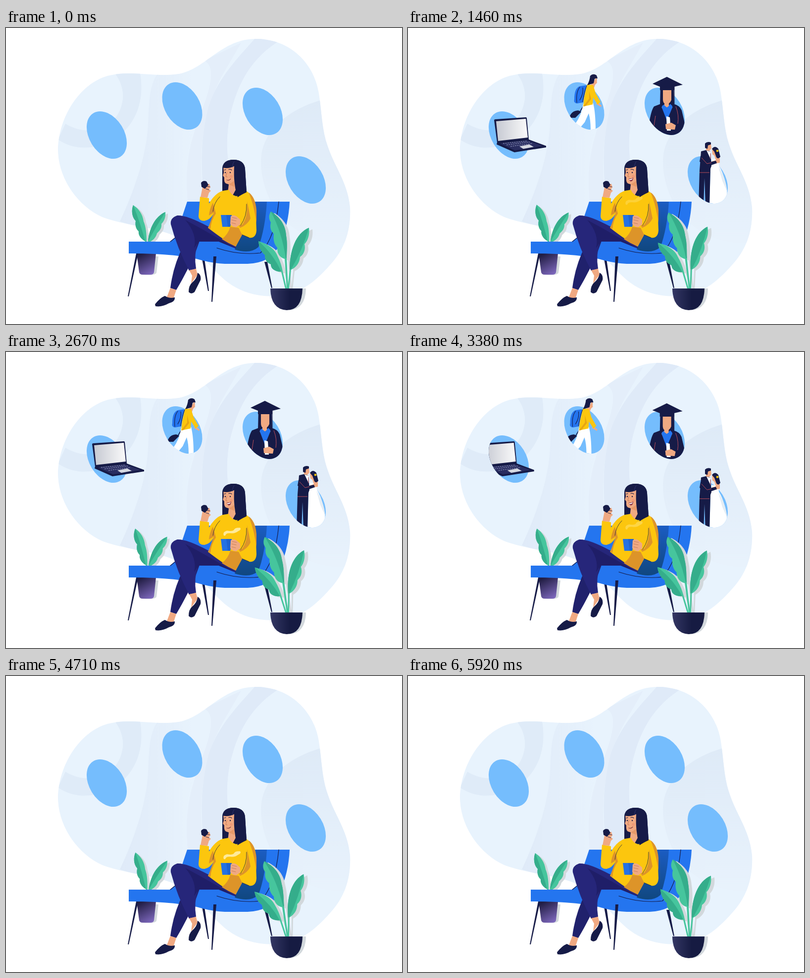
An HTML page for the animation above (5.96 s loop, 800 by 600 pixels).

```html
<!DOCTYPE html>
<html lang="en">
<head>
<meta charset="utf-8">
<title>Planning life goals</title>
<style>
  html, body { margin: 0; width: 100%; height: 100%; overflow: hidden; background: #fff }
  svg { display: block; width: 100vw; height: 100vh }
  .skin { fill: #f0a982 } .navy { fill: #161b47 } .yellow { fill: #fcc60e }
  .line { fill: none; stroke: #161b47; stroke-linecap: round; stroke-linejoin: round }
  .light { fill: #46c59d } .dark { fill: #35ad8b } .shade { fill: #d2d8dc }
</style>
</head>
<body>
<svg viewBox="0 0 800 600">
  <defs>
    <ellipse id="oval" rx="35.3" ry="52" transform="rotate(-31.5)"/>
    <path id="above" d="M-40.5-16V-90H90V16H40.5Z"/>
    <path id="beside" d="M-13.5-48L13.5 48H90V-48Z"/>
    <clipPath id="clipLaptop"><use href="#oval" x="203.5" y="217"/><use href="#beside" x="203.5" y="217"/></clipPath>
    <clipPath id="clipTravel"><use href="#oval" x="356" y="158"/><use href="#above" x="356" y="158"/></clipPath>
    <clipPath id="clipGrad"><use href="#oval" x="518.5" y="169"/><use href="#above" x="518.5" y="169"/></clipPath>
    <clipPath id="clipCouple"><use href="#oval" x="605.5" y="308"/><use href="#above" x="605.5" y="308"/></clipPath>

    <path id="blobShape" d="M510 22C572 24 622 69 632 132C638 171 638 207 650 240C664 282 691 315 695 364C697 410 684 449 655 480C626 513 598 536 558 542C514 548 473 537 441 510C408 481 376 434 330 417C287 402 235 399 194 383C144 360 105 304 105 246C107 178 150 113 205 97C254 84 300 101 350 93C405 82 437 19 510 22Z"/>
    <clipPath id="clipBlob"><use href="#blobShape"/></clipPath>

    <linearGradient id="fadeRight"><stop stop-color="#dfeaf8"/><stop offset="1" stop-color="#e8f3fd"/></linearGradient>
    <linearGradient id="fadeUp" x1="0" y1="1" x2="0" y2="0"><stop stop-color="#e8f2fc"/><stop offset="1" stop-color="#deeaf7"/></linearGradient>
    <linearGradient id="screen"><stop stop-color="#c6c9d2"/><stop offset="1" stop-color="#fafafa"/></linearGradient>
    <linearGradient id="cushion" x1="0" y1="0" x2="0" y2="1"><stop stop-color="#1b5cc2"/><stop offset="1" stop-color="#10477f"/></linearGradient>
    <linearGradient id="backPot" x1=".3" y1="0" x2=".8" y2="1"><stop stop-color="#211d43"/><stop offset="1" stop-color="#806ac0"/></linearGradient>
    <linearGradient id="frontPot"><stop stop-color="#343764"/><stop offset=".6" stop-color="#161b42"/></linearGradient>

    <path id="backLeaves" d="M257 359C269 367 276 378 278 392C283 404 284 418 284 432L288 470H286L281 432C273 428 267 420 268 412C261 406 261 397 262 391C254 383 253 369 257 359ZM322 373C323 386 318 393 314 397C315 407 309 412 305 416C303 425 297 430 290 434L288 470H286L287 433C289 407 301 382 322 373Z"/>
    <path id="frontLeaves" d="M535 372C553 383 565 399 566 421C569 437 567 453 567 466L570 528H567L563 468C552 465 547 455 548 445C540 437 540 425 541 417C532 409 534 399 535 394C530 386 531 379 535 372ZM612 405C614 420 609 432 603 438C606 451 600 460 594 464C593 477 586 485 576 490L572 528H569L573 490C573 452 585 416 612 405ZM510 432C530 438 544 449 549 463C554 473 557 483 559 493L567 528H564L556 494C543 494 535 488 535 479C524 474 523 467 523 460C514 452 511 443 510 432Z"/>
  </defs>

  <use href="#blobShape" fill="#e8f3fd"/>
  <g clip-path="url(#clipBlob)">
    <path fill="#dfebf8" d="M220 92H271C280 145 265 193 222 223C185 247 139 250 105 226L120 194C162 220 211 207 229 169C241 143 238 116 220 92Z"/>
    <path fill="url(#fadeRight)" d="M305 94C283 128 291 181 284 226C275 286 251 347 230 392L380 440V84Z"/>
    <path fill="#e4eefa" d="M400 66C431 80 404 144 389 185C361 262 363 310 368 360H400C386 260 397 169 437 96L475 30Z"/>
    <path fill="#dfeaf8" d="M504 20C472 57 429 99 410 157C394 216 391 279 402 356H470C445 294 439 218 458 157C473 102 503 57 549 28Z"/>
    <path fill="url(#fadeUp)" d="M637 146C567 166 515 211 515 271C516 355 575 440 690 436L710 300Z"/>
  </g>

  <g fill="#75bdfd">
    <use href="#oval" x="203.5" y="217"/><use href="#oval" x="356" y="158"/>
    <use href="#oval" x="518.5" y="169"/><use href="#oval" x="605.5" y="308"/>
  </g>

  <g clip-path="url(#clipLaptop)"><g id="laptop">
    <path class="navy" d="M174 187Q174 185 177 185L238 181Q240 181 240 183L244 226L279 239V242L215 252L179 236L180 232Z"/>
    <path fill="url(#screen)" d="M178 189L238 184L242 222L182 229Z"/>
    <path fill="#292d60" d="M186 234L241 228L272 239L216 248Z"/>
    <path stroke="#9ba1c5" stroke-dasharray="3 1.5" d="M192 234L240 229M199 237L246 231M207 240L252 234"/>
    <path fill="#d5d8e1" d="M225 240L245 236L254 241L233 245Z"/>
  </g></g>

  <g clip-path="url(#clipTravel)"><g id="travel">
    <path class="line" stroke-width="1.6" d="M355 157L347 170"/>
    <path class="navy" d="M326 182Q329 168 344 167L350 170L338 182Z"/>
    <path class="skin" d="M372 106H381L382 111L378 115L376 121L368 119ZM382 150L391 157L390 160L385 157L380 154Z"/>
    <path fill="#fff" d="M354 153L374 152Q379 172 379 207H369Q369 186 365 173L357 191L347 203L338 194Q351 176 354 153Z"/>
    <path class="yellow" d="M362 114L374 116L379 132L389 150L383 155L374 141L373 155L354 159L356 140Z"/>
    <path fill="#e6a514" d="M366 128L370 144L359 158L354 159L366 143Z"/>
    <path fill="#2474ee" d="M347 118L360 116L353 151L341 153Q334 152 336 144Q336 122 347 118Z"/>
    <path class="line" stroke-width="1.1" d="M347 120Q339 130 341 151M353 121Q355 133 347 146M361 117Q356 130 353 150"/>
    <path class="navy" d="M368 97Q374 91 381 96L383 102L377 103L375 112L362 116Q367 107 368 97Z"/>
    <path class="skin" d="M378 102L382 103L381 110L377 111Z"/>
  </g></g>

  <g clip-path="url(#clipGrad)"><g id="grad">
    <path class="navy" d="M510 116H537L538 160H509Z"/>
    <path fill="#2475ef" d="M513 158L519 154L523 160L530 154L534 158L532 181L523 188L515 180Z"/>
    <path class="skin" d="M515 126H532V146Q530 151 527 153V158L523 161L518 157V153Q515 150 515 145Z"/>
    <path class="navy" d="M510 154L523 188L537 154Q549 157 553 167L560 197V250H487V194Q491 167 497 159ZM494 113L523 99L555 115L538 119V126Q524 121 509 126V119Z"/>
    <path fill="none" stroke="#b94d59" d="M541 159Q548 177 545 194M500 178L497 198"/>
    <path fill="#fff" d="M522 179L529 181L531 208H523Z"/>
    <path class="skin" d="M520 195L532 192L541 197L539 206L521 205Z"/>
    <path class="line" stroke-width="1" d="M523 112L538 119V154"/>
  </g></g>

  <g clip-path="url(#clipCouple)"><g id="couple">
    <path fill="#fff" d="M613 265L627 268L628 279Q644 304 647 360H609L611 287Z"/>
    <path fill="#e5edf4" d="M627 281Q642 302 645 332L635 310Z"/>
    <path class="navy" d="M592 250L604 247L611 251L613 280L611 285L609 360H601L599 304L597 360H587L589 289Z"/>
    <path fill="#fff" d="M603 248L611 251L611 265Z"/>
    <path class="skin" d="M602 236L612 235L613 244L609 249L602 248ZM614 246L621 248L623 258L630 264L630 273L613 276L612 271L622 268L619 259L615 256Z"/>
    <path class="navy" d="M600 243V234Q605 229 612 232V236L606 238L605 245ZM614 245Q620 237 627 245L631 261Q627 267 623 262L619 251Z"/>
    <circle cx="625" cy="249" r="2.3" class="yellow"/>
    <path class="navy" d="M591 259L605 273L622 269L624 274L607 280L589 271Z"/>
    <path fill="none" stroke="#b94d59" d="M593 263L604 275L613 273M589 293H609M611 254V266"/>
  </g></g>

  <g id="backPlant">
    <use href="#backLeaves" class="shade" x="5" y="3"/>
    <use href="#backLeaves" class="light"/>
    <path class="dark" d="M257 359C253 369 254 383 262 391C261 397 261 406 268 412C267 420 273 428 281 432Q273 400 257 359ZM322 373C301 382 289 407 287 433Q301 406 322 373Z"/>
  </g>
  <path class="shade" d="M276 463H308L304 496Q302 502 276 500Z"/>
  <path fill="url(#backPot)" d="M264 457H303L299 495Q298 500 292 500H276Q270 500 269 495Z"/>

  <g id="sofa">
    <path class="navy" d="M263 457L246 544H248L267 457ZM396 468L408 533H410L401 468ZM522 474L536 527H538L528 474Z"/>
    <path fill="#2475ef" d="M366 352H573Q571 398 553 439Q535 477 488 478H442Q420 477 396 471Q350 457 248 457V433H331L342 424Z"/>
    <path fill="url(#cushion)" d="M504 352H527Q524 405 510 444Q493 459 462 449Z"/>
    <path class="line" stroke-width="1.2" d="M426 446Q470 461 514 456Q544 425 551 352M332 433L342 425"/>
    <path class="navy" d="M419 463H425L417 555H415Z"/>
  </g>

  <g id="woman">
    <path fill="#20216c" d="M380 425L391 432Q376 477 344 531L332 527Q338 480 359 440Z"/>
    <path fill="#26267a" d="M408 402Q365 379 346 380Q331 385 333 398Q346 447 370 492L384 488Q379 460 388 433H430L464 447L467 430Z"/>
    <path fill="#1f1e68" d="M362 389Q407 413 462 446L430 433H389L380 446Q387 418 362 389Z"/>
    <path class="skin" d="M370 491L384 488L387 500L374 518L376 502ZM332 527L344 531L338 549L324 548Z"/>
    <path class="navy" d="M376 516Q386 508 387 496Q395 500 393 511L381 535Q374 541 369 535Q369 522 376 516ZM301 560Q311 547 321 543Q330 549 341 546Q342 555 329 558Q315 566 302 564Z"/>

    <path class="navy" d="M437 331V285Q439 267 460 267Q481 267 483 286L486 334Q475 338 469 343L440 331Z"/>
    <path class="skin" d="M439 281L461 280L464 328L457 341L448 334L450 317L444 315Q440 312 441 303L438 299L440 293Z"/>
    <path fill="#e79969" d="M450 317L461 310V322Z"/>
    <path class="yellow" d="M438 330L450 328Q455 339 465 341L487 331Q501 342 504 361L506 410Q505 427 491 425L477 419L464 443Q440 430 408 405Q417 389 419 377Q412 389 401 391Q389 391 389 381L392 342L410 345L410 356Q422 335 438 330Z"/>
    <path fill="#dd9429" d="M418 354Q411 367 410 380L420 374Q410 400 409 405L413 408Q414 390 424 376ZM487 351Q489 383 477 399L470 400L473 405Q488 399 494 386ZM453 403L470 405L477 419L464 443Q450 437 436 428Q449 418 453 403ZM490 333Q504 343 506 369V396Q501 358 490 333Z"/>
    <path class="line" stroke-width=".8" d="M432 342Q420 354 418 372M486 357Q487 382 474 400M477 419L491 425"/>
    <path class="navy" d="M437 288Q436 267 460 267Q482 268 483 286L486 333Q475 338 468 343Q459 317 461 280Q450 286 437 283Z"/>
    <path class="line" style="stroke:#383b78" stroke-width=".8" d="M461 271Q457 275 458 282"/>
    <path class="line" stroke-width="1.1" d="M441 288L444 287M450 287Q453 285 456 288"/>
    <circle cx="443" cy="293" r="1.2" class="navy"/><circle cx="453" cy="293" r="1.2" class="navy"/>
    <path class="line" style="stroke:#c87855" stroke-width="1" d="M446 293L444 301L447 302"/>
    <circle cx="455" cy="301" r="3" fill="#ed916f" opacity=".6"/>
    <path id="smile" class="line" style="stroke:#863f42" stroke-width="1.2" d="M446 308Q450 310 454 306"/>
    <g id="laugh"><path fill="#862f42" d="M446 305Q451 306 455 303Q455 310 450 311Q447 310 446 305Z"/><path fill="#fff" d="M447 306Q451 307 454 304L453 307Q450 309 447 308Z"/></g>

    <path class="skin" d="M393 343L397 323L403 317L411 316L413 323L410 327L414 330L410 334L407 344Z"/>
    <path class="navy" d="M394 314Q398 308 405 311L409 318L402 326L395 322Z"/>
    <path class="line" stroke-width=".9" d="M405 321L412 322M404 326L410 328"/>

    <path fill="#2472e4" d="M434 379H456L453 403H437Z"/>
    <path fill="#1f63cf" d="M445 379H456L453 403H448Z"/>
    <path class="skin" d="M454 382Q459 377 466 382L473 388V398L465 404Q456 403 453 397Z"/>
    <path class="line" style="stroke:#bd7454" stroke-width=".8" d="M457 384L466 386M456 389L465 391M456 395L464 397"/>
    <path id="steam" fill="#fff4bd" d="M440 372Q437 364 447 362Q456 364 460 361Q462 355 473 356Q476 360 469 363Q463 368 454 367Q444 366 443 372Z"/>
  </g>

  <g id="frontPlant">
    <use href="#frontLeaves" class="shade" x="7" y="3"/>
    <use href="#frontLeaves" class="light"/>
    <path class="dark" d="M535 372C553 383 565 399 566 421C569 437 567 453 567 466L565 467Q558 415 535 372ZM612 405C585 416 573 452 573 490L576 489Q599 450 612 405ZM510 432C511 443 514 452 523 460C523 467 524 474 535 479C535 488 543 494 556 494Q540 458 510 432Z"/>
  </g>
  <path class="shade" d="M541 528H606Q605 570 572 572Z"/>
  <path fill="url(#frontPot)" d="M534 528H599Q598 572 567 572Q535 570 534 528Z"/>
</svg>
<script>
const LOOP = 5960, CYCLE = LOOP / 3;
const $ = id => document.getElementById(id);
const clamp = v => Math.min(1, Math.max(0, v));
const ramp = (t, from, to) => clamp((t - from) / (to - from));
const move = (id, x, y) => $(id).setAttribute('transform', `translate(${x} ${y})`);
const turn = (id, angle, x, y) => $(id).setAttribute('transform', `rotate(${angle} ${x} ${y})`);

// id, hidden offset, entry start and end, exit start and end
const items = [
  ['laptop', -118, 0, 100, 1000, 2950, 3680],
  ['travel', -88, 0, 200, 1100, 3060, 3760],
  ['grad', -8, 120, 350, 1300, 3130, 3850],
  ['couple', 0, 126, 560, 1460, 3130, 3900]
];

function draw(t) {
  for (const [id, x, y, inA, inB, outA, outB] of items) {
    const away = (1 - ramp(t, inA, inB)) ** 3 + ramp(t, outA, outB) ** 3;
    move(id, x * away, y * away);
  }
  const laughing = t >= 420 && t < 3650;
  $('laugh').style.display = laughing ? '' : 'none';
  $('smile').style.display = laughing ? 'none' : '';

  const p = t % CYCLE;
  const sway = (1 - Math.cos(2 * Math.PI * p / CYCLE)) / 2;
  turn('frontPlant', -5.8 * sway, 568, 528);
  turn('backPlant', 2.9 * sway, 286, 466);
  move('steam', 0, (700 - p) * 0.018);
  $('steam').style.opacity = 0.8 * ramp(p, 300, 650) * (1 - ramp(p, 1000, 1650));
}

function tick() {
  draw(performance.now() % LOOP);
  requestAnimationFrame(tick);
}
tick();
</script>
</body>
</html>
```
